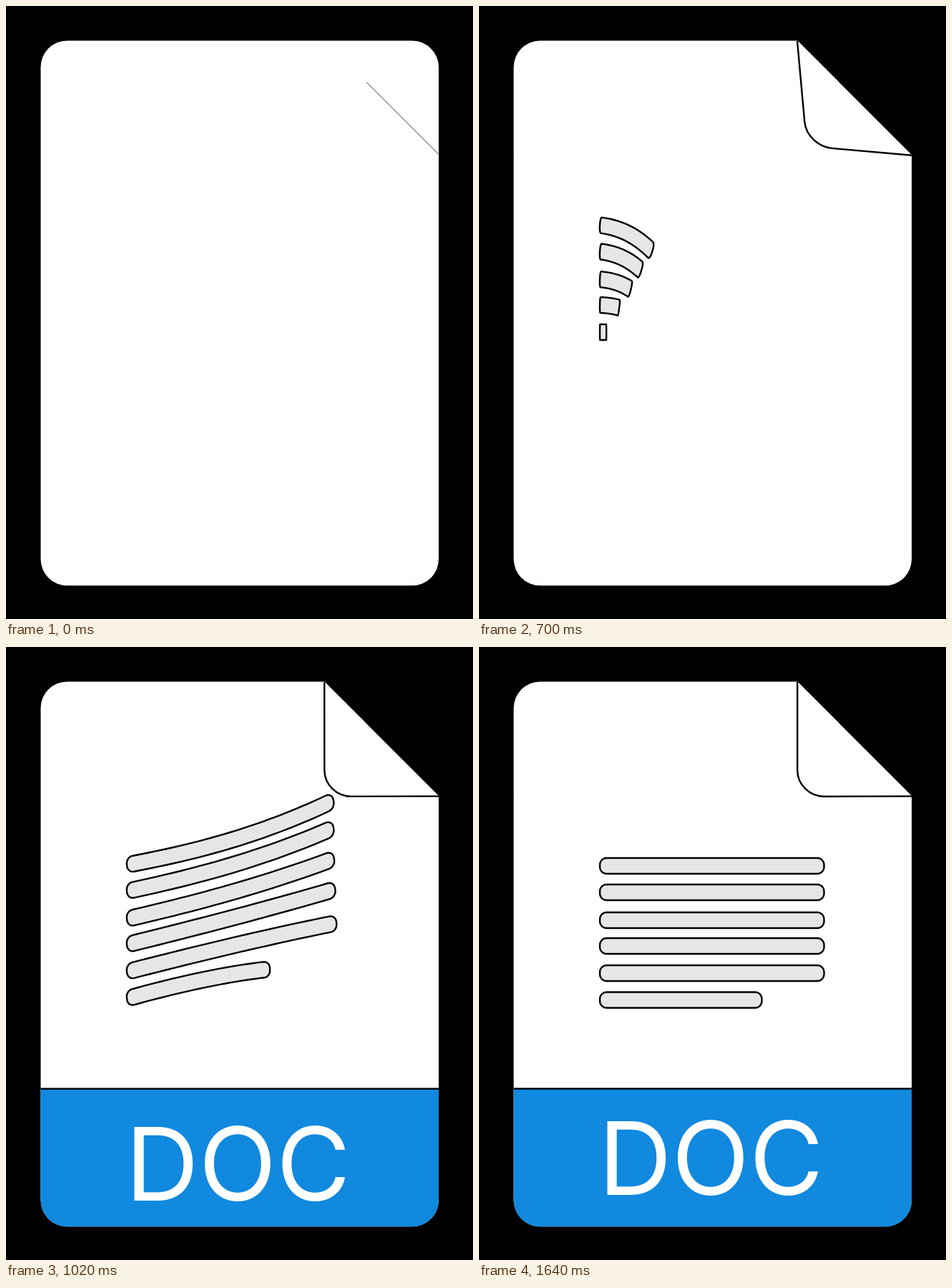
An HTML page with a canvas for the animation above (2.44 s loop, 653x857 px).

```html
<!DOCTYPE html>
<html lang="en">
<head>
<meta charset="utf-8">
<title>Document icon</title>
<style>
  html, body { margin: 0; width: 100%; height: 100%; overflow: hidden; background: #000; }
  canvas { display: block; }
</style>
</head>
<body>
<canvas id="stage" width="653" height="857"></canvas>
<script>
const ctx = document.getElementById('stage').getContext('2d');
const LOOP = 2440, STEP = 20;
const PAGE = { left: 48.5, top: 48.5, right: 605, bottom: 810.3, radius: 37 };
const FOLD = { x: 445.5, y: 207.8 };
const BAR = { left: 169, width: 313.5, half: 11, radius: 9.5, delay: 20 };
const LINE = 2.4;

const lerp = (a, b, p) => a + (b - a) * p;
const clamp01 = v => Math.min(1, Math.max(0, v));
const linear = p => p;
const sine = p => (1 - Math.cos(Math.PI * p)) / 2;

// cubic-bezier(.25, .1, .25, 1)
function ease(x) {
  if (x <= 0 || x >= 1) return clamp01(x);
  let lo = 0, hi = 1;
  for (let i = 0; i < 24; i++) {
    const s = (lo + hi) / 2;
    if (0.75 * s * (1 - s) + s ** 3 < x) lo = s; else hi = s;
  }
  const s = lo;
  return 0.3 * s * (1 - s) ** 2 + 3 * s * s * (1 - s) + s ** 3;
}
const progress = (t, start, duration) => ease((t - start) / duration);

// Value at time t on a path of [time, value] turning points
function track(t, keys, easing) {
  return keys.slice(1).reduce((value, [end, next], i) => {
    const start = keys[i][0];
    return lerp(value, next, easing(clamp01((t - start) / (end - start))));
  }, keys[0][1]);
}
const stretchAt = t => track(t, [[610, 0], [940, 0.96], [1540, 1]], linear);
const tipAt = t => track(t, [[620, 0], [720, 41], [1020, -90], [1225, 24.5], [1540, 0]], sine);
const rootAt = t => track(t, [[620, 0], [720, 12], [920, -76], [1140, -27], [1250, -26], [1380, 0]], sine);

function bodyPath() {
  const { left, top, right, bottom, radius } = PAGE;
  ctx.beginPath();
  ctx.moveTo(left + radius, top);
  ctx.lineTo(FOLD.x, top);
  ctx.lineTo(right, FOLD.y);
  ctx.arcTo(right, bottom, left, bottom, radius);
  ctx.arcTo(left, bottom, left, top, radius);
  ctx.arcTo(left, top, right, top, radius);
  ctx.closePath();
}

function drawBand(t) {
  const top = 617.5 + 195 * (1 - progress(t, 710, 320));
  const textDrop = 165 * (1 - progress(t, 720, 412));
  ctx.save();
  bodyPath();
  ctx.clip();
  ctx.fillStyle = '#1089df';
  ctx.fillRect(0, top, 653, 240);
  ctx.fillStyle = '#000';
  ctx.fillRect(0, top - LINE / 2, 653, LINE);
  ctx.fillStyle = '#fff';
  ctx.font = '400 142px Inter, Arial, sans-serif';
  ctx.textAlign = 'left';
  const inset = ctx.measureText('DOC').actualBoundingBoxLeft;
  ctx.fillText('DOC', 179 + inset, 765.7 + textDrop);
  ctx.restore();
}

// The corner turns over from outside the fold to inside it.
function drawFlap(t) {
  const p = progress(t, 30, 1025);
  const at = (x0, y0, x1, y1) => [lerp(x0, x1, p), lerp(y0, y1, p)];
  const k = 0.55, out = { x: 606.2, y: 47.4 }, inn = { x: 445.2, y: 209 };
  ctx.beginPath();
  ctx.moveTo(...at(443, out.y, 445.2, 49));
  ctx.lineTo(...at(568, out.y, inn.x, 172));
  ctx.bezierCurveTo(
    ...at(568 + 38 * k, out.y, inn.x, 172 + 37 * k),
    ...at(out.x, 85 - 37 * k, 483 - 38 * k, inn.y),
    ...at(out.x, 85, 483, inn.y));
  ctx.lineTo(...at(out.x, 209.6, 605, 208.6));
  ctx.fillStyle = '#fff';
  ctx.fill();
  ctx.lineWidth = LINE;
  ctx.stroke();

  // Crease along the fold
  ctx.beginPath();
  ctx.moveTo(504, 106.5);
  ctx.lineTo(605, 207.5);
  ctx.lineWidth = 0.8;
  ctx.stroke();
}

function drawBar(t, y, width) {
  const { left, half, radius: r } = BAR;
  const stretch = stretchAt(t), size = width / BAR.width;
  if (stretch < 0.01) return;
  const tip = tipAt(t), root = rootAt(t);
  const length = width * Math.sqrt(stretch ** 2 - (tip / BAR.width) ** 2);
  const slope = root * size, curl = (tip - root) * size, power = 2.4;

  // Bends a point of the straight bar; v is its height above or below the middle.
  const bend = (x, v) => {
    const u = x / width;
    const grade = (slope + power * curl * u ** (power - 1)) / length;
    return [
      left + u * length - 0.45 * v * grade / Math.hypot(1, grade),
      y + root * 0.025 + slope * u + curl * u ** power + v
    ];
  };
  const corner = (cx, cy, from) => {
    for (let i = 0; i <= 8; i++) {
      const a = from + i * Math.PI / 16;
      ctx.lineTo(...bend(cx + r * Math.cos(a), cy + r * Math.sin(a)));
    }
  };
  const edge = (x0, x1, v) => {
    for (let i = 1; i < 24; i++) ctx.lineTo(...bend(lerp(x0, x1, i / 24), v));
  };

  ctx.beginPath();
  corner(r, r - half, Math.PI);
  edge(r, width - r, -half);
  corner(width - r, r - half, -Math.PI / 2);
  corner(width - r, half - r, 0);
  edge(width - r, r, half);
  corner(r, half - r, Math.PI / 2);
  ctx.closePath();
  ctx.fillStyle = '#e6e6e6';
  ctx.fill();
  ctx.lineWidth = LINE;
  ctx.stroke();
}

function draw(t) {
  ctx.fillStyle = '#000';
  ctx.fillRect(0, 0, 653, 857);
  ctx.strokeStyle = '#000';
  ctx.lineJoin = 'round';
  bodyPath();
  ctx.fillStyle = '#fff';
  ctx.fill();
  drawBand(t);
  drawFlap(t);
  [306, 343, 382, 418, 456, 493.5].forEach((y, i) =>
    drawBar(t - i * BAR.delay, y, i < 5 ? BAR.width : 226.5));
}

function frame() {
  const t = performance.now() % LOOP;
  draw(Math.floor(t / STEP) * STEP);
  requestAnimationFrame(frame);
}
frame();
</script>
</body>
</html>
```
